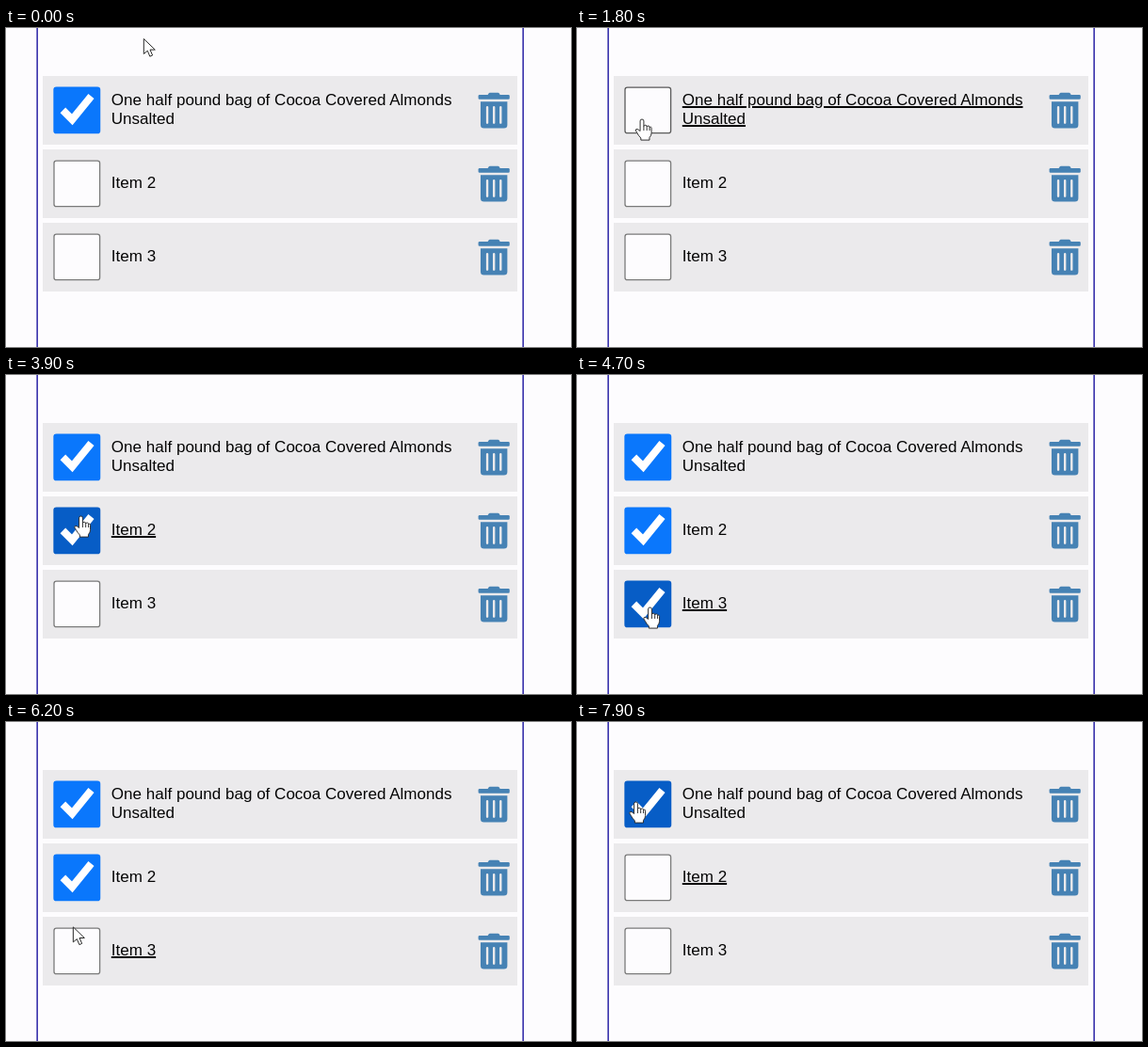
Recreate the animation shown at these times as an HTML page. Size 600 by 339 pixels, loop 8 s.

```html
<!DOCTYPE html>
<html lang="en">
<head>
<meta charset="utf-8">
<title>Checklist</title>
<style>
  html, body { margin: 0; width: 100%; height: 100%; overflow: hidden; background: #fdfcfe; }
  #stage { position: relative; width: 600px; height: 339px; overflow: hidden; }
  #stage > svg { position: absolute; left: 0; top: 0; }
  .row { position: absolute; left: 39px; width: 504px; height: 72.5px; background: #ebeaec; }
  .row svg { position: absolute; left: 0; top: 0; overflow: visible; }
  .label {
    position: absolute; left: 72.8px; top: 0; height: 72.5px; display: flex; align-items: center;
    font: 17.05px/20px "Liberation Sans", Arial, sans-serif; color: #050505; white-space: pre;
  }
  .focus .label span { text-decoration: underline; text-decoration-thickness: 1.6px; text-underline-offset: 1px; }
  .rail { fill: #2b23a6; }
  .box { fill: #fdfcfe; stroke: #7a7a7a; stroke-width: 1.3; }
  .hover .box { stroke: #5a5a5a; }
  .checked .box { fill: #0a77fc; stroke: #0a77fc; }
  .checked.hover .box { fill: #075dc6; stroke: #075dc6; }
  .tick { fill: none; stroke: #fff; stroke-width: 7.9; visibility: hidden; }
  .checked .tick { visibility: visible; }
  .bin { fill: #4682b4; }
  .slots { stroke: #ebeaec; stroke-width: 32; stroke-linecap: round; }
  .pointer { fill: #fff; stroke: #2a2a2a; stroke-linejoin: round; }
</style>
</head>
<body>
<div id="stage">
  <svg width="600" height="339">
    <rect class="rail" x="32.4" width="1.5" height="339"/>
    <rect class="rail" x="548.4" width="1.5" height="339"/>
  </svg>
</div>
<script>
const LOOP = 8000, STEP = 100;
const TOP = 51, PITCH = 78, BOX = 50;
const labels = ["One half pound bag of Cocoa Covered Almonds\nUnsalted", "Item 2", "Item 3"];

// Eased pointer moves from a resting place
const origin = { x: 146, y: 11 };
const moves = [
  { from: 100, to: 900, x: 69, y: 97 },
  { from: 2800, to: 2900, x: 79.5, y: 150 },
  { from: 4200, to: 4600, x: 77.5, y: 247 },
  { from: 4950, to: 5200, x: 127, y: 309 },
  { from: 5500, to: 5850, x: 75, y: 246 },
  { from: 5950, to: 6550, x: 64.5, y: 170 },
  { from: 7500, to: 7900, x: 62.5, y: 85 }
];
const clicks = [
  { at: 1300, row: 0 }, { at: 2200, row: 0 }, { at: 3500, row: 1 },
  { at: 4600, row: 2 }, { at: 5900, row: 2 }, { at: 7100, row: 1 }
];

const stage = document.getElementById("stage");
const rows = labels.map((text, i) => {
  const row = document.createElement("div");
  row.style.top = TOP + i * PITCH + "px";
  row.innerHTML = `
    <svg width="504" height="72.5">
      <rect class="box" x="12" y="12.1" width="48.6" height="48.6" rx="2.5"/>
      <path class="tick" d="M21.4 36.4l9.9 9.9L51.5 21.5"/>
      <g class="bin" transform="translate(462.6 17.7) scale(.074)">
        <path d="M32 128H416V464a48 48 0 0 1-48 48H80a48 48 0 0 1-48-48z"/>
        <rect y="32" width="448" height="64" rx="16"/>
        <path d="M136 32L146 13Q153 0 167 0H281Q295 0 302 13L312 32z"/>
        <path class="slots" d="M128 208v224m96 0v-224m96 0v224" fill="none"/>
      </g>
    </svg>
    <div class="label"><span>${text}</span></div>`;
  stage.append(row);
  return row;
});

stage.insertAdjacentHTML("beforeend", `
  <svg width="600" height="339">
    <g class="pointer" id="arrow"><path d="M.3 .5v16l4-3.3 2.5 6 2.8-1.2-2.6-5.9h5.3z"/></g>
    <g class="pointer" id="hand">
      <path d="M-2 13V2a2 2 0 0 1 4 0V8a1.7 1.7 0 0 1 3.4 .4a1.5 1.5 0 0 1 3 .8a1.1 1.1 0 0 1 2.1 .8V15q0 3-2.2 5.3V23H-1.2V20.8Q-4 18-5.4 15Q-8 12-6.5 11T-2 13"/>
      <path d="M2 8v4.5m3.4-4v4m3-3.3v3.3" fill="none"/>
    </g>
  </svg>`);
const arrow = document.getElementById("arrow");
const hand = document.getElementById("hand");

const ease = k => k * k * (3 - 2 * k);

function pointerAt(t) {
  let { x, y } = origin;
  for (const m of moves) {
    const k = ease(Math.min(1, Math.max(0, (t - m.from) / (m.to - m.from))));
    x += (m.x - x) * k;
    y += (m.y - y) * k;
  }
  return { x, y };
}

function draw(t) {
  const { x, y } = pointerAt(t);
  const done = clicks.filter(c => c.at <= t);
  const focus = done.length ? done[done.length - 1].row : -1;
  let over = false;
  rows.forEach((row, i) => {
    const dx = x - 50.5, dy = y - (TOP + i * PITCH + 11.5);
    const hover = dx > 0 && dx < BOX && dy > 0 && dy < BOX;
    const toggles = done.filter(c => c.row === i).length;
    row.className = "row";
    row.classList.toggle("checked", (toggles + (i === 0)) % 2 === 1);
    row.classList.toggle("focus", focus === i);
    row.classList.toggle("hover", hover);
    over = over || hover;
  });
  arrow.style.display = over ? "none" : "";
  hand.style.display = over ? "" : "none";
  arrow.setAttribute("transform", `translate(${x} ${y})`);
  hand.setAttribute("transform", `translate(${x} ${y}) scale(.96)`);
}

const start = performance.now();
function frame() {
  const t = (performance.now() - start) % LOOP;
  draw(Math.floor(t / STEP) * STEP);
  requestAnimationFrame(frame);
}
frame();
</script>
</body>
</html>
```
